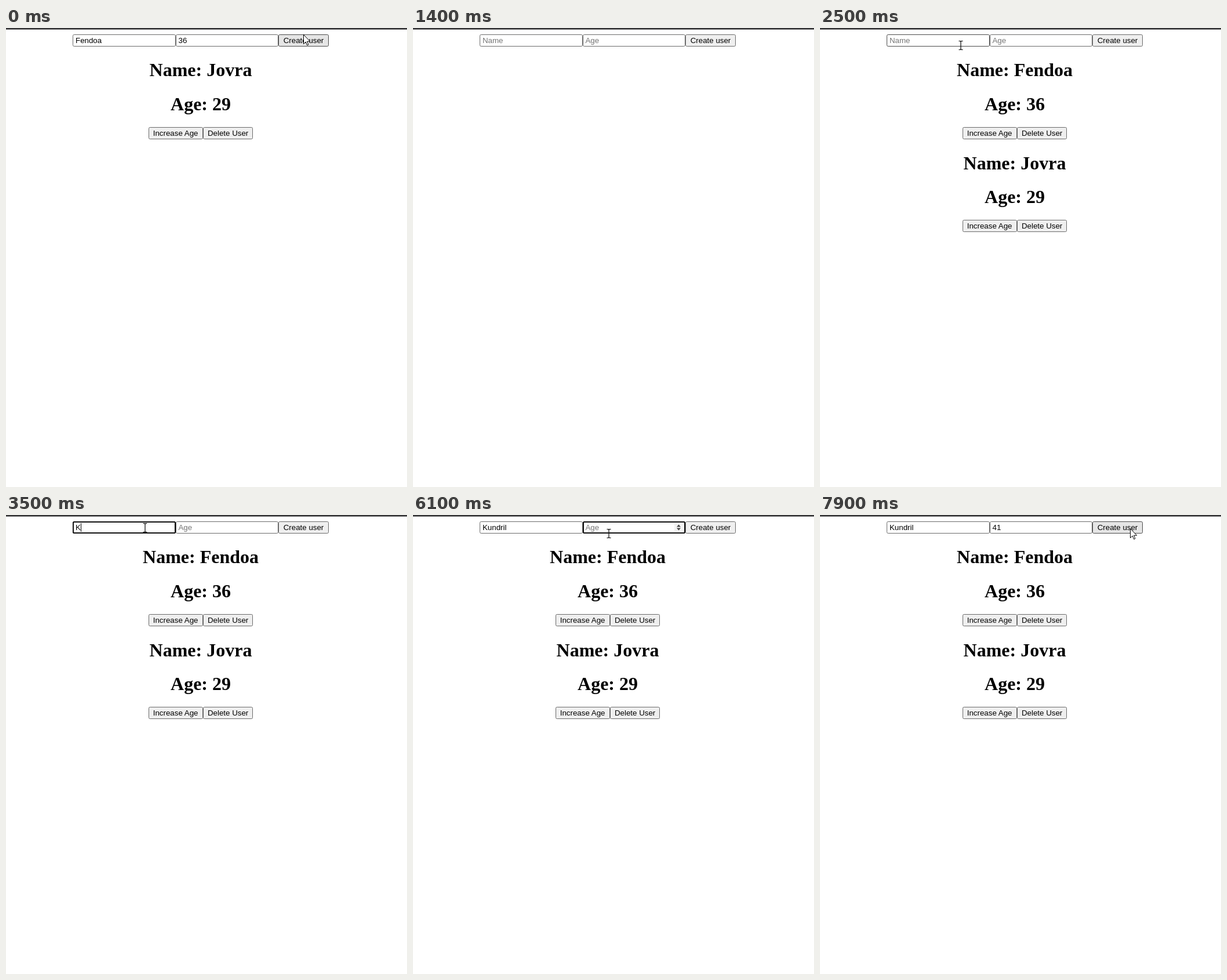
Write an HTML page that moves like this. It is 692 px wide and 792 px high and loops after 8 s.

```html
<!DOCTYPE html>
<html lang="en">
<head>
<meta charset="utf-8">
<title>Users</title>
<style>
html, body { margin: 0; width: 100%; height: 100%; overflow: hidden; background: #fff; }
body { position: relative; cursor: none; }
body::before { content: ""; position: absolute; width: 100%; height: 3px; background: linear-gradient(#343436 2px, #808082 2px); }
main { position: absolute; left: 0; top: 10.75px; width: 672px; font-family: "Liberation Serif", serif; }
.row { display: flex; justify-content: center; height: 22px; }
.field, .button {
  position: relative; box-sizing: border-box; height: 21px; border: 1px solid #6a6a6a;
  border-radius: 2.5px; font: 13.333px/19px "Liberation Sans", sans-serif; white-space: pre;
}
.field { width: 177.5px; padding-left: 3.5px; }
.button { padding: 0 7.2px; background: #efefef; }
.hover { border-color: #4a4a4a; }
.button.hover { background: #e5e5e5; }
.button.active { background: #f5f5f5; }
.focus { outline: 2px solid #101010; outline-offset: -2px; z-index: 1; }
.empty { color: #757575; }
.caret { position: absolute; top: 2px; width: 1px; height: 15px; background: #000; }
.spin { position: absolute; right: 3px; top: 2px; width: 15px; height: 15px; background: #f3f3f3; visibility: hidden; }
.hover .spin, .focus .spin { visibility: visible; }
h1 { margin: 21.44px 0; font-size: 32px; line-height: 37px; text-align: center; }
#pointer { position: absolute; left: 0; top: 0; overflow: visible; }
</style>
</head>
<body>
<main>
  <div class="row">
    <div class="field" id="name"><span></span><i class="caret"></i></div>
    <div class="field" id="age"><span></span><i class="caret"></i><svg class="spin" viewBox="0 0 15 15"><path d="M4 6.5 7.5 2.5 11 6.5zM4 8.5 7.5 12.5 11 8.5z" fill="#404040"/></svg></div>
    <div class="button" id="create">Create user</div>
  </div>
  <div id="list"></div>
</main>
<svg id="pointer" width="1" height="1">
  <path id="arrow" d="M.5.5V16.5L4.2 13 6.7 18.8 9 17.8 6.5 12.2H11.7Z" fill="#fff" stroke="#000"/>
  <path id="beam" d="M-3.5-7.5H-1L0-6.5 1-7.5H3.5M0-6.5V6.5M-3.5 7.5H-1L0 6.5 1 7.5H3.5" fill="none" stroke="#000" stroke-width="1.2"/>
</svg>
<script>
const LOOP = 8000, STEP = 100;
const $ = id => document.getElementById(id);

// time, x, y of the pointer
const path = [
  [0, 513, 11], [100, 513, 11], [200, 506, 15], [300, 462, 32], [400, 345, 38],
  [500, 200, 26], [600, 90, -40], [1700, 76, -30], [1800, 86, 9], [2100, 218, 38],
  [2500, 243, 30], [2700, 240, 22], [4900, 240, 22], [5400, 338, 32],
  [7000, 338, 32], [7600, 535, 23], [8000, 535, 23]
];
// time, text of each field
const names = [[0, "Fendoa"], [1300, ""], [3500, "K"], [4000, "Ku"], [4100, "Kun"],
  [4200, "Kund"], [4300, "Kundr"], [4400, "Kundri"], [4500, "Kundril"]];
const ages = [[0, "36"], [1300, ""], [6400, "4"], [6500, "41"]];
const focusSpans = { name: [2700, 5500], age: [5500, 7700] };

const card = ([name, age]) => `<section><h1>Name: ${name}</h1><h1>Age: ${age}</h1>
  <div class="row"><div class="button">Increase Age</div><div class="button">Delete User</div></div></section>`;
$("list").innerHTML = [["Fendoa", 36], ["Jovra", 29]].map(card).join("");
const [newest, oldest] = $("list").children;

const latest = (keys, t) => keys.filter(k => k[0] <= t).pop();
const within = (t, from, to) => t >= from && t < to;

function pointerAt(t) {
  const i = path.findIndex(k => k[0] > t);
  const [t0, x0, y0] = path[i - 1], [t1, x1, y1] = path[i];
  const u = (t - t0) / (t1 - t0), e = u * u * (3 - 2 * u);
  return [x0 + (x1 - x0) * e, y0 + (y1 - y0) * e];
}

function drawField(id, keys, placeholder, t) {
  const field = $(id), [label, caret] = field.children;
  const [changed, text] = latest(keys, t), [from, to] = focusSpans[id];
  const focused = within(t, from, to);
  label.textContent = text || placeholder;
  label.classList.toggle("empty", !text);
  field.classList.toggle("focus", focused);
  const blinkStart = Math.max(from, changed);
  caret.style.visibility = focused && (t - blinkStart) % 1000 < 500 ? "visible" : "hidden";
  caret.style.left = 3.5 + (text ? label.offsetWidth : 0) + "px";
}

function draw(t) {
  const [x, y] = pointerAt(t);
  const over = (left, right) => within(x, left, right) && within(y, 10, 33);
  drawField("name", names, "Name", t);
  drawField("age", ages, "Age", t);
  $("name").classList.toggle("hover", over(116, 293));
  $("age").classList.toggle("hover", over(293, 470));
  $("create").classList.toggle("hover", over(470, 557));
  $("create").classList.toggle("active", within(t, 100, 200) || within(t, 7700, 7800));
  newest.hidden = t < 1500;
  oldest.hidden = within(t, 1300, 1500);

  const typing = over(116, 470);
  $("beam").style.display = typing ? "" : "none";
  $("arrow").style.display = typing ? "none" : "";
  $("pointer").style.transform = `translate(${Math.round(x)}px, ${Math.round(y)}px)`;
}

function tick() {
  draw(Math.floor(performance.now() % LOOP / STEP) * STEP);
  requestAnimationFrame(tick);
}
tick();
</script>
</body>
</html>
```
